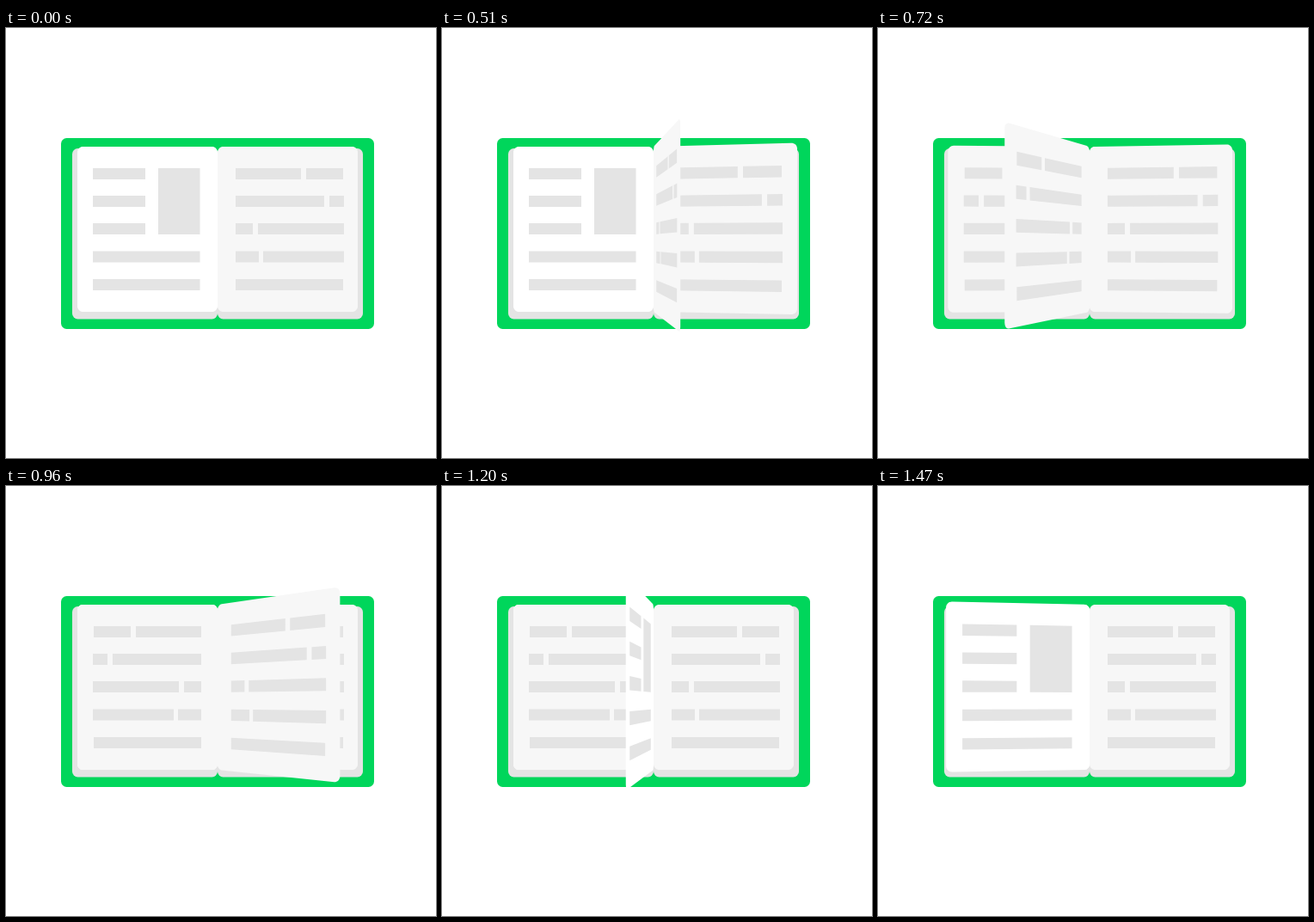
Write an HTML page with a canvas that moves like this. It is 500 by 500 pixels and loops after 1.5 s.

```html
<!DOCTYPE html>
<html lang="en">
<head>
<meta charset="utf-8">
<title>Turning book</title>
<style>
html, body { margin: 0; width: 100%; height: 100%; overflow: hidden; background: #fff; }
canvas { display: block; width: 500px; height: 500px; }
</style>
</head>
<body>
<canvas id="stage" width="500" height="500"></canvas>
<script>
const ctx = document.getElementById('stage').getContext('2d');
const LOOP = 1500;
const EYE = 250, DEPTH = 700;
const HINGE = 246, WIDTH = 163, TOP = 138, BOTTOM = 330, RADIUS = 6.5;
const GREEN = '#00d65b', GREY = '#e4e4e4', PAPER = '#f7f7f7', WHITE = '#fff';
const ROWS = [163, 195, 227, 259.5, 292];
const BAR = 13;

// Bars per row, as distances from the left margin.
const TEXT = [
  [[0, 76], [82, 125]],
  [[0, 103], [109, 126]],
  [[0, 20], [26, 126]],
  [[0, 27], [32, 126]],
  [[0, 125]]
];
const textBars = margin => TEXT.flatMap((row, i) =>
  row.map(([a, b]) => [margin + a, ROWS[i], margin + b, ROWS[i] + BAR]));

const FRONT = { paper: PAPER, bars: textBars(21) };
const BACK = { paper: PAPER, bars: textBars(19) };
const PICTURE = {
  paper: WHITE,
  bars: ROWS.map((y, i) => [i < 3 ? 84 : 20.5, y, 145, y + BAR])
    .concat([[20.5, 163, 69, 240]])
};

const SHEETS = [
  { start: 287, time: 475, ease: [0.42, 0, 0.58, 1], back: BACK },
  { start: 433, time: 485, ease: [0.42, 0, 0.58, 1], back: BACK },
  { start: 600, time: 900, ease: [0.34, 0, 0.78, 0.715], back: PICTURE }
];

function bezier([x1, y1, x2, y2], x) {
  if (x <= 0) return 0;
  if (x >= 1) return 1;
  const at = (a, b, u) => 3 * (1 - u) * (1 - u) * u * a + 3 * (1 - u) * u * u * b + u * u * u;
  let lo = 0, hi = 1;
  for (let i = 0; i < 30; i++) {
    const mid = (lo + hi) / 2;
    if (at(x1, x2, mid) < x) lo = mid; else hi = mid;
  }
  return at(y1, y2, lo);
}

function project(u, y, angle) {
  const s = DEPTH / (DEPTH - u * Math.sin(angle));
  return [EYE + (HINGE - EYE + u * Math.cos(angle)) * s, EYE + (y - EYE) * s];
}

function fillShape(points, angle, color) {
  ctx.beginPath();
  for (const [u, y] of points) ctx.lineTo(...project(u, y, angle));
  ctx.closePath();
  ctx.fillStyle = color;
  ctx.fill();
}

function roundPoints(x0, y0, x1, y1, r) {
  const centres = [[x1 - r, y1 - r], [x0 + r, y1 - r], [x0 + r, y0 + r], [x1 - r, y0 + r]];
  const points = [];
  centres.forEach(([cx, cy], q) => {
    for (let i = 0; i <= 8; i++) {
      const a = (q + i / 8) * Math.PI / 2;
      points.push([cx + r * Math.cos(a), cy + r * Math.sin(a)]);
    }
  });
  return points;
}

const SHEET = roundPoints(0, TOP, WIDTH, BOTTOM, RADIUS);

function drawPage(face, angle) {
  fillShape(SHEET, angle, face.paper);
  for (const [a, y0, b, y1] of face.bars) {
    fillShape([[a, y0], [b, y0], [b, y1], [a, y1]], angle, GREY);
  }
}

function roundRect(x0, y0, x1, y1, r, color) {
  ctx.beginPath();
  ctx.roundRect(x0, y0, x1 - x0, y1 - y0, r);
  ctx.fillStyle = color;
  ctx.fill();
}

function draw(t) {
  ctx.fillStyle = WHITE;
  ctx.fillRect(0, 0, 500, 500);
  roundRect(64, 128, 428, 350, 6.5, GREEN);
  roundRect(77, 140, HINGE, 338.5, 6.5, GREY);
  roundRect(HINGE, 140, 415, 338.5, 6.5, GREY);
  drawPage(PICTURE, Math.PI);
  drawPage(FRONT, 0);

  const turned = [], waiting = [];
  for (const sheet of SHEETS) {
    const turn = bezier(sheet.ease, (t - sheet.start) / sheet.time);
    if (turn === 0) continue;
    const angle = turn * Math.PI;
    if (project(WIDTH, EYE, angle)[0] > HINGE) waiting.unshift(angle);
    else turned.push([sheet.back, angle]);
  }
  for (const [face, angle] of turned) drawPage(face, angle);
  for (const angle of waiting) drawPage(FRONT, angle);
}

const begin = performance.now();
function tick() {
  draw((performance.now() - begin) % LOOP);
  requestAnimationFrame(tick);
}
tick();
</script>
</body>
</html>
```
